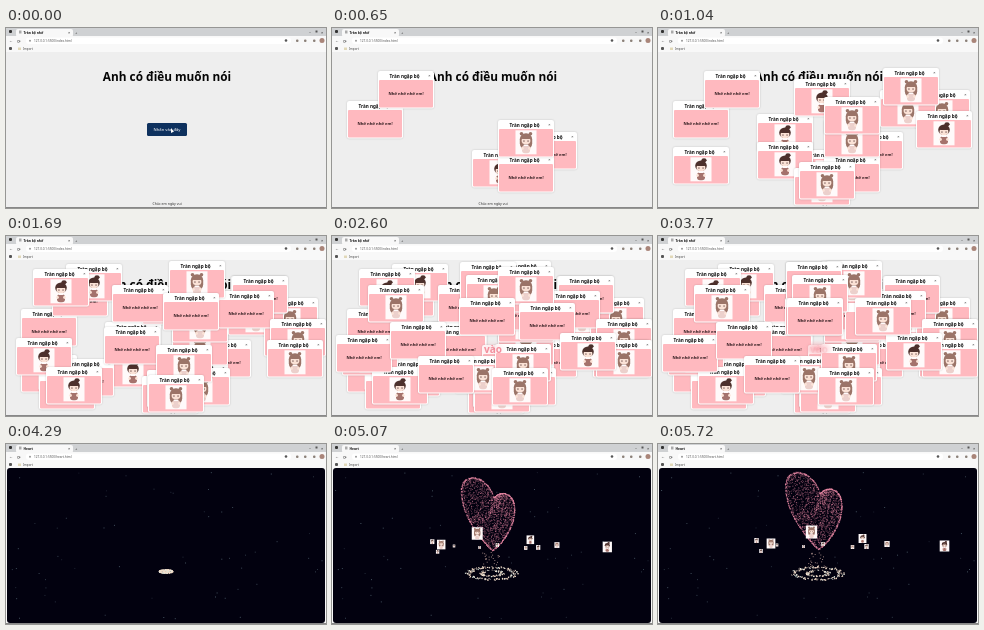
An HTML page with a canvas that plays this animation: 320 by 180 pixels, repeating every 5850 ms.

```html
<!DOCTYPE html>
<html lang="vi">
<head>
<meta charset="utf-8">
<style>
html, body { margin: 0; width: 100%; height: 100%; overflow: hidden; background: #fff; }
canvas { display: block; width: 100vw; height: 100vh; }
</style>
</head>
<body>
<canvas width="320" height="180"></canvas>
<script>
const ctx = document.querySelector('canvas').getContext('2d');
const LOOP = 5850, STEP = 130, SKY_START = 4160;

// Each batch of popups fills the span up to `end`; t = text, a / b = portraits.
const batches = [
  { start: 390, end: 1040, cards: [
    [15, 73, 't'], [46, 43, 't'], [140, 122, 'a'], [189, 104, 't'], [166, 127, 't'], [166, 92, 'b'],
    [256, 62, 'b'], [222, 62, 'b'], [99, 86, 'a'], [99, 114, 'a'], [136, 51, 'a'], [15, 119, 'a'],
    [258, 83, 'a'], [225, 40, 'b'], [166, 69, 'b'], [136, 140, 'b'], [141, 134, 'b']] },
  { start: 1040, end: 1690, cards: [
    [60, 28, 'a'], [27, 33, 'a'], [52, 123, 't'], [33, 136, 't'], [10, 102, 'a'], [40, 131, 'a'],
    [226, 40, 't'], [212, 55, 't'], [264, 83, 'b'], [261, 104, 'b'], [163, 25, 'b'], [106, 49, 't'],
    [157, 57, 't'], [168, 132, 'b'], [98, 91, 't'], [150, 109, 'b'], [142, 139, 'b']] },
  { start: 1690, end: 2600, cards: [
    [128, 26, 't'], [36, 49, 'b'], [4, 99, 't'], [58, 86, 't'], [134, 39, 'b'], [166, 31, 'b'],
    [123, 120, 'b'], [86, 120, 't'], [127, 62, 't'], [187, 67, 't'], [264, 104, 'b'], [228, 97, 'a'],
    [163, 108, 'b'], [160, 132, 'b']] },
  { start: 2600, end: 3770, cards: [
    [168, 25, 'b'], [128, 26, 't'], [134, 39, 'b'], [129, 62, 't'], [197, 62, 'b']] }
];

// Floating portraits: centre x, centre y, size
const photos = [
  [98.5, 96.5, 5], [113, 99.5, 10], [103, 107, 4], [119, 101, 3], [153.5, 88, 13], [165, 100, 4],
  [145.5, 102.5, 3], [194.5, 103, 4], [204.5, 94.5, 9], [208.5, 102.5, 5], [229, 100, 6], [286.5, 102, 11]
];

// Heart outline as four cubic curves
const heart = [
  [[162, 49], [154, 22], [124, 20], [127, 46]],
  [[127, 46], [128, 68], [146, 92], [160, 106]],
  [[162, 49], [170, 40], [184, 44], [184, 62]],
  [[184, 62], [184, 80], [172, 98], [160, 106]]
];

function seeded(seed) {
  return () => (seed = (seed * 16807) % 2147483647) / 2147483647;
}
function rect(x, y, w, h, color, r = 0) {
  ctx.fillStyle = color;
  ctx.beginPath();
  ctx.roundRect(x, y, w, h, r);
  ctx.fill();
}
function dot(x, y, size, color) {
  ctx.fillStyle = color;
  ctx.fillRect(x, y, size, size);
}
function oval(x, y, rx, ry, color) {
  ctx.fillStyle = color;
  ctx.beginPath();
  ctx.ellipse(x, y, rx, ry, 0, 0, Math.PI * 2);
  ctx.fill();
}
function text(str, x, y, size, color = '#111', weight = 400, align = 'left') {
  ctx.font = `${weight} ${size}px "Noto Sans", sans-serif`;
  ctx.textAlign = align;
  ctx.textBaseline = 'alphabetic';
  ctx.fillStyle = color;
  ctx.fillText(str, x, y);
}
const ease = (t, from, to) => {
  const p = Math.min(1, Math.max(0, (t - from) / (to - from)));
  return 1 - (1 - p) ** 3;
};

function portrait(kind, cx, cy, size) {
  const bun = kind === 'a';
  const hair = bun ? '#4d302c' : '#9b7468';
  ctx.save();
  ctx.translate(cx, cy);
  ctx.scale(size / 24, size / 24);
  rect(-10.5, -12, 21, 24, '#fffafa');
  if (bun) {
    oval(3, -9, 2.6, 2, hair);
    rect(-4, 3, 8, 8, '#a5726c', 3);
    oval(0, -3.5, 5.8, 5.3, hair);
  } else {
    oval(-4.5, -8.5, 1.8, 1.8, hair);
    oval(4.5, -8.5, 1.8, 1.8, hair);
    rect(-6.2, -9, 12.4, 16, hair, 6);
    rect(-4, 3, 8, 8, '#ecd0cc', 3);
  }
  oval(0, -1.6, 4.4, 3.6, '#fbe2d6');
  rect(-4.4, -5.4, 8.8, 2.2, hair, 1);
  dot(-2.6, -1.8, 1.1, '#4b2c2c');
  dot(1.5, -1.8, 1.1, '#4b2c2c');
  rect(-2.5, 2.2, 5, 1.6, '#fffafa', 0.8);
  oval(-3.4, 6, 1.2, 1.6, '#fbe2d6');
  oval(3.4, 6, 1.2, 1.6, '#fbe2d6');
  ctx.restore();
}

function popup([x, y, kind]) {
  ctx.shadowColor = '#0003';
  ctx.shadowBlur = 2;
  rect(x, y, 56, 37.5, '#fff', 2);
  ctx.shadowBlur = 0;
  rect(x + 1, y + 9, 54, 27.5, '#ffb9bf', 1);
  text('Tràn ngập bộ', x + 26.5, y + 6.5, 4.6, '#111', 700, 'center');
  text('×', x + 51.5, y + 6, 4, '#333', 400, 'center');
  if (kind === 't') text('Nhớ nhớ nhớ em!', x + 28, y + 24.3, 4, '#2b181b', 600, 'center');
  else portrait(kind, x + 28, y + 22.3, 24);
}

function browser(title, page) {
  rect(0, 0, 320, 8, '#cfd1d3');
  rect(0, 8, 320, 16, '#f8f8f8');
  rect(10, 1, 57, 8, '#f8f8f8', 2);
  rect(3, 2, 3, 3, '#333', 1);
  rect(13, 2.5, 2.5, 3, '#aaa');
  text(title, 17.5, 5.5, 3.3, '#111', 600);
  text('×', 62, 5.5, 4, '#222');
  text('+', 69, 5.5, 4, '#444');
  text('–', 303, 5, 4, '#333');
  rect(309.5, 2.5, 2, 2, '#555');
  text('×', 315, 5.5, 4, '#222');
  text('←', 3, 14, 4, '#333');
  text('⟳', 11, 14.5, 4.5, '#333');
  rect(20, 9.5, 265, 6.5, '#fff', 3);
  oval(24, 12.7, 1, 1, '#999');
  text('127.0.0.1:5500/' + page, 28, 14, 3.1, '#555');
  oval(280, 12.5, 1.3, 1.3, '#555');
  for (const x of [290, 298, 307]) rect(x, 11.5, 2.5, 2.5, '#8b8078', 1);
  oval(316, 12.5, 2.5, 2.5, '#a98579');
  rect(3, 19, 3, 3, '#555', 1);
  rect(12, 19.5, 3, 2.5, '#e1d8b8');
  text('Import', 17, 21.8, 3, '#444');
}

function confession(t) {
  rect(0, 24, 320, 155, '#eee');
  text('Anh có điều muốn nói', 161, 53, 11.8, '#050505', 700, 'center');
  text('Chúc em ngày vui', 161, 177, 3.5, '#333', 400, 'center');
  if (t < 520) {
    rect(141, 95, 40, 13, '#0e315e', 1.5);
    text('Nhấn vào đây', 161, 103, 4.2, '#fff', 500, 'center');
    ctx.fillStyle = '#fff';
    ctx.beginPath();
    ctx.moveTo(165, 100);
    ctx.lineTo(165, 105);
    ctx.lineTo(168, 103.5);
    ctx.fill();
  }
  for (const { start, end, cards } of batches) {
    const gap = (end - start) / cards.length;
    cards.forEach((card, i) => { if (t >= start + (i + 1) * gap - 1) popup(card); });
  }
  if (t > 2100) {
    const fade = ease(t, 2800, 3700);
    ctx.save();
    ctx.translate(159, 113);
    ctx.scale(1.9, 1);
    const glow = ctx.createRadialGradient(0, 0, 0, 0, 0, 9);
    glow.addColorStop(0, `rgba(246,160,170,${0.3 + fade * 0.6})`);
    glow.addColorStop(1, 'rgba(255,185,191,0)');
    ctx.fillStyle = glow;
    ctx.fillRect(-9, -9, 18, 18);
    ctx.restore();
    ctx.globalAlpha = 1 - fade * 0.8;
    text('vào', 161, 117, 10, '#f38f9d', 700, 'center');
    ctx.globalAlpha = 1;
  }
}

// Point on one heart curve, pulled towards the middle by r
function heartPoint([p0, p1, p2, p3], u, r) {
  const v = 1 - u;
  return [157, 68].map((mid, k) => {
    const edge = v ** 3 * p0[k] + 3 * v * v * u * p1[k] + 3 * v * u * u * p2[k] + u ** 3 * p3[k];
    return mid + (edge - mid) * r;
  });
}

function sky(t) {
  rect(1, 24, 318, 155, '#02010f', 3);
  const rnd = seeded(77);
  for (let i = 0; i < 60; i++) {
    const x = 3 + rnd() * 313, y = 27 + rnd() * 148;
    const light = 0.2 + 0.35 * Math.abs(Math.sin(i + t / 700));
    dot(x, y, 0.9, `rgba(150,185,195,${light})`);
  }

  const spread = ease(t, 4290, 5330);
  const turn = (t - SKY_START) / 1800;
  for (let i = 0; i < 240; i++) {
    const a = rnd() * Math.PI * 2 + turn;
    const ring = i % 3 ? 20 + rnd() * 7 : 8 + rnd() * 5;
    const r = ring * (0.26 + 0.74 * spread);
    const x = 159.5 + Math.cos(a) * r, y = 127 + Math.sin(a) * r * 0.27 + spread * 2;
    dot(x, y, 0.6 + rnd() * 0.7, i % 4 ? '#f6dfca' : '#d8e4dd');
  }

  const grow = ease(t, 4420, 5460);
  if (grow > 0) {
    for (let i = 0; i < 2400; i++) {
      const edge = i % 4 === 0;
      const r = edge ? 0.96 + rnd() * 0.04 : Math.sqrt(rnd());
      const [hx, hy] = heartPoint(heart[Math.floor(rnd() * 4)], rnd(), r);
      const x = 160 + (hx - 160) * grow, y = 128 + (hy - 128) * grow;
      const alpha = edge ? 0.8 : 0.3 + rnd() * 0.45;
      dot(x, y, 0.8, `rgba(232,137,164,${alpha})`);
    }
    for (let i = 0; i < 26; i++) {
      const y = 108 + ((rnd() * 16 - t / 120) % 16 + 16) % 16;
      dot(150 + rnd() * 18, y, 0.8, '#ecc5b8');
    }
  }

  const fly = ease(t, 4550, 5330);
  if (fly > 0) photos.forEach(([x, y, size], i) => {
    const drift = (t - 5720) / 1000 * (size - 4.5) * 1.6;
    portrait(i % 3 === 1 ? 'b' : 'a', 160 + (x + drift - 160) * fly, 128 + (y - 128) * fly, size * fly);
  });
}

function frame(now) {
  const t = Math.floor((now % LOOP) / STEP) * STEP;
  const dark = t >= SKY_START;
  rect(0, 0, 320, 180, '#f8f8f8');
  browser(dark ? 'Heart' : 'Tràn bộ nhớ', dark ? 'heart.html' : 'index.html');
  if (dark) sky(t);
  else confession(t);
  rect(0, 179, 320, 1, '#888');
  requestAnimationFrame(frame);
}
requestAnimationFrame(frame);
</script>
</body>
</html>
```
